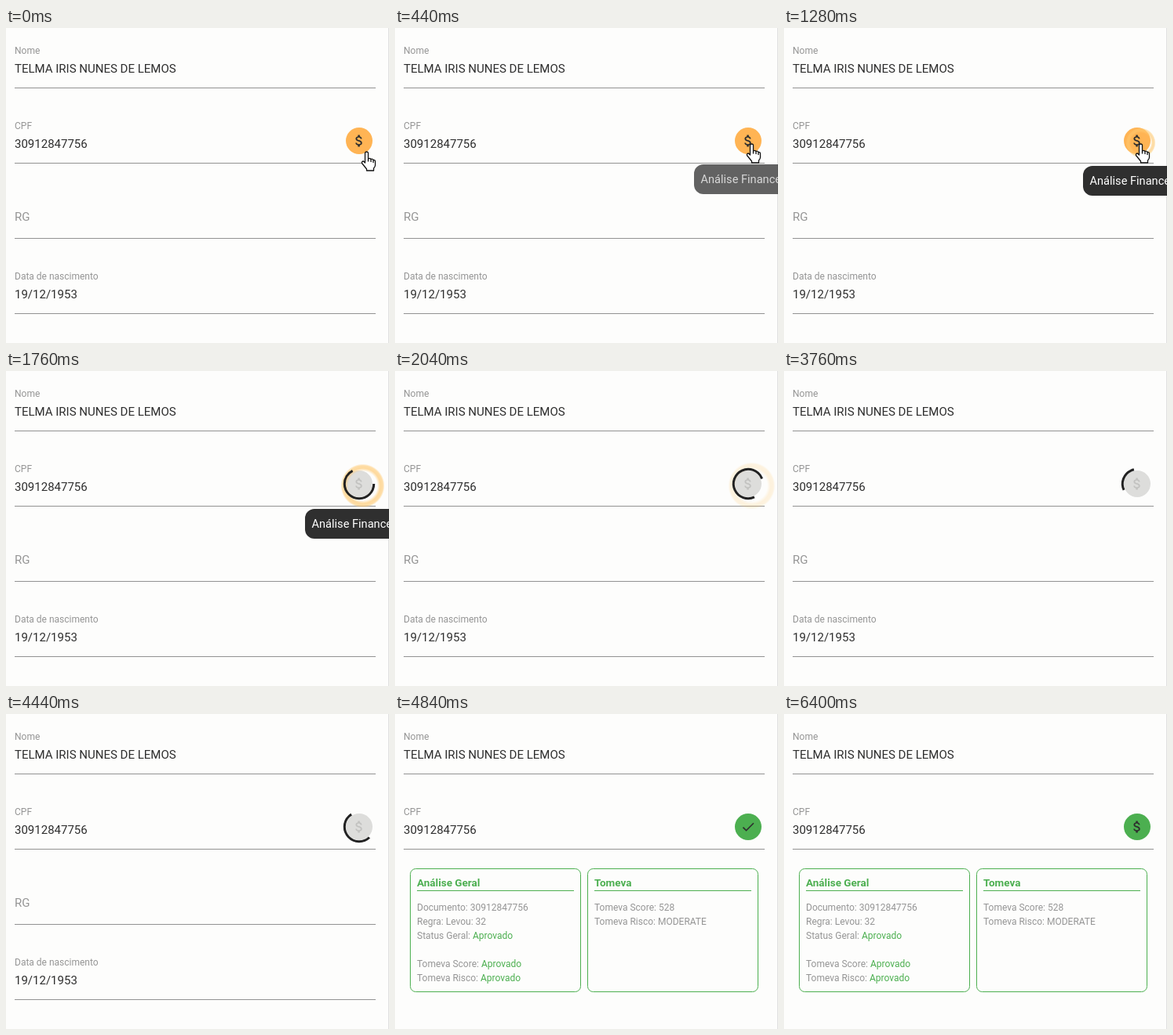
An HTML page with a canvas that plays this animation: 488 px wide and 402 px high, repeating every 6.96 s.

```html
<!DOCTYPE html>
<html lang="pt-BR">
<head>
<meta charset="utf-8">
<title>Análise</title>
<style>
  html, body { margin: 0; width: 100%; height: 100%; overflow: hidden; background: #fdfdfc; }
  canvas { display: block; width: 488px; height: 402px; }
</style>
</head>
<body>
<canvas id="stage" width="488" height="402"></canvas>
<script>
const ctx = document.getElementById('stage').getContext('2d');
const LOOP = 6960, STEP = 40;
const PRESS = 1120, BUSY = 1360, DONE = 4760, CHECK = 4800, RESET = 6400;
const BTN = { x: 450, y: 144, r: 17 };
const INK = '#2e2e2e', LABEL = '#959595', RULE = '#929292', GREEN = '#4caf50', PAGE = '#fdfdfc';
const FONT = 'Roboto, Arial, sans-serif';
const DOC = '30912847756';

const MONEY = new Path2D('M11.8 10.9c-2.27-.59-3-1.2-3-2.15 0-1.09 1.01-1.85 2.7-1.85 1.78 0 2.44.85 2.5 2.1h2.21c-.07-1.72-1.12-3.3-3.21-3.81V3h-3v2.16c-1.94.42-3.5 1.68-3.5 3.61 0 2.31 1.91 3.46 4.7 4.13 2.5.6 3 1.48 3 2.41 0 .69-.49 1.79-2.7 1.79-2.06 0-2.87-.92-2.98-2.1h-2.2c.12 2.19 1.76 3.42 3.68 3.83V21h3v-2.15c1.95-.37 3.5-1.5 3.5-3.55 0-2.84-2.43-3.81-4.7-4.4z');
const TICK = new Path2D('M9 16.17L4.83 12l-1.42 1.41L9 19 21 7l-1.41-1.41z');
const HAND = new Path2D('M-2 2Q-2 0 0 0Q2 0 2 2V9Q4 7.5 5.5 9.5Q7.5 8.5 8.5 10.5Q11 10 11 12.5V17Q11 19 9 21V24H0V22L-6 14.5Q-6.5 12 -4 12L-2 14Z');

const clamp = v => Math.min(1, Math.max(0, v));
const ramp = (t, a, b) => clamp((t - a) / (b - a));
const easeOut = v => 1 - (1 - v) ** 3;
const rad = deg => deg * Math.PI / 180;

// cubic-bezier(.4, 0, .2, 1)
function standard(x) {
  let lo = 0, hi = 1, s = x;
  for (let i = 0; i < 24; i++) {
    s = (lo + hi) / 2;
    const px = 1.2 * (1 - s) ** 2 * s + 0.6 * (1 - s) * s * s + s ** 3;
    if (px < x) lo = s; else hi = s;
  }
  return 3 * (1 - s) * s * s + s ** 3;
}

function text(str, x, y, size, color) {
  ctx.font = `${size} ${FONT}`;
  ctx.fillStyle = color;
  ctx.fillText(str, x, y);
  return x + ctx.measureText(str).width;
}

function rect(x, y, w, h, color) {
  ctx.fillStyle = color;
  ctx.fillRect(x, y, w, h);
}

function field(y, label, value) {
  if (value) {
    text(label, 11, y + 33, '12px', LABEL);
    text(value, 11, y + 57, '15px', INK);
  } else {
    text(label, 11, y + 54, '15px', LABEL);
  }
  rect(11, y + 76, 460, 1, RULE);
}

function card(x, title, rows) {
  ctx.strokeStyle = GREEN;
  ctx.lineWidth = 1;
  ctx.beginPath();
  ctx.roundRect(x + 0.5, 197.5, 217, 157, 7);
  ctx.stroke();
  text(title, x + 9, 220, 'bold 13.5px', GREEN);
  rect(x + 9, 225, 200, 1, GREEN);
  rows.forEach(([label, status], i) => {
    const y = 251 + i * 18;
    const end = text(label, x + 9, y, '12px', LABEL);
    if (status) text(status, end, y, '12px', GREEN);
  });
}

function results(t) {
  ctx.globalAlpha = 0.4 + 0.6 * ramp(t, DONE, DONE + 80);
  card(19, 'Análise Geral', [
    ['Documento: ' + DOC], ['Regra: Levou: 32'], ['Status Geral: ', 'Aprovado'], [''],
    ['Tomeva Score: ', 'Aprovado'], ['Tomeva Risco: ', 'Aprovado']
  ]);
  card(245, 'Tomeva', [['Tomeva Score: 528'], ['Tomeva Risco: MODERATE']]);
  ctx.globalAlpha = 1;
}

function icon(path, color) {
  ctx.save();
  ctx.translate(BTN.x - 10, BTN.y - 10);
  ctx.scale(20 / 24, 20 / 24);
  ctx.fillStyle = color;
  ctx.fill(path);
  ctx.restore();
}

function button(t) {
  const busy = t >= BUSY && t < DONE;
  ctx.fillStyle = busy ? '#dddddb' : t >= DONE ? GREEN : '#ffb454';
  ctx.beginPath();
  ctx.arc(BTN.x, BTN.y, BTN.r, 0, 2 * Math.PI);
  ctx.fill();
  icon(t >= CHECK && t < RESET ? TICK : MONEY, busy ? '#c2c2c0' : INK);
}

function spinner(t) {
  if (t < BUSY || t >= DONE) return;
  // the spinner stalls briefly while the request is pending
  const s = t - 1356 - 125 * ramp(t, 3200, 3325);
  const half = Math.floor(s / 666.5);
  const e = standard(s / 666.5 - half);
  const mid = -90 + 360 * s / 1568 + 135 * (half + e);
  const span = 10 + 265 * (half % 2 ? 1 - e : e);
  ctx.strokeStyle = '#222';
  ctx.lineWidth = 3;
  ctx.beginPath();
  ctx.arc(BTN.x, BTN.y, 18.7, rad(mid - span / 2), rad(mid + span / 2));
  ctx.stroke();
}

function ripple(t) {
  const p = ramp(t, PRESS, 1800);
  const alpha = 0.75 * Math.min(1, p * 4) * (1 - ramp(t, 1800, 2160));
  if (alpha <= 0) return;
  const r = 8 + 20 * easeOut(p) + 3 * ramp(t, 1800, 2160);
  const g = ctx.createRadialGradient(454.5, 146.5, 0, 454.5, 146.5, r);
  const tone = a => `rgba(255,200,110,${a * alpha})`;
  g.addColorStop(0.66, tone(0));
  g.addColorStop(0.8, tone(0.9));
  g.addColorStop(0.92, tone(0.8));
  g.addColorStop(1, tone(0));
  ctx.fillStyle = g;
  ctx.beginPath();
  ctx.arc(454.5, 146.5, r, 0, 2 * Math.PI);
  ctx.fill();
}

function tooltip(t) {
  const a = ramp(t, 320, 480) * (1 - ramp(t, 1840, 2000));
  if (!a) return;
  const y = 176 - 8 * (1 - a);
  ctx.globalAlpha = a;
  ctx.fillStyle = '#2f2f2f';
  ctx.beginPath();
  ctx.roundRect(381, y, 150, 38, 12);
  ctx.fill();
  text('Análise Financeira', 389.5, y + 24, '14.6px', '#fff');
  ctx.globalAlpha = 1;
}

function cursor(t) {
  if (t >= BUSY) return;
  const p = easeOut(ramp(t, 0, 480));
  ctx.save();
  ctx.translate(459.5 - 5 * p, 158 - 10 * p);
  ctx.fillStyle = '#fff';
  ctx.strokeStyle = '#111';
  ctx.lineWidth = 1.3;
  ctx.lineJoin = 'round';
  ctx.fill(HAND);
  ctx.stroke(HAND);
  ctx.beginPath();
  for (const [x, y] of [[2, 9], [5.5, 9.5], [8.5, 10.5]]) {
    ctx.moveTo(x, y);
    ctx.lineTo(x, y + 3.5);
  }
  ctx.stroke();
  ctx.restore();
}

function draw(t) {
  rect(0, 0, 488, 402, PAGE);
  rect(487, 0, 1, 402, '#e0e0e0');
  field(0, 'Nome', 'TELMA IRIS NUNES DE LEMOS');
  field(96, 'CPF', DOC);
  if (t < DONE) {
    field(192, 'RG');
    field(288, 'Data de nascimento', '19/12/1953');
  } else {
    results(t);
  }
  button(t);
  ripple(t);
  spinner(t);
  tooltip(t);
  cursor(t);
}

const start = performance.now();
function tick() {
  const t = (performance.now() - start) % LOOP;
  draw(Math.floor(t / STEP) * STEP);
  requestAnimationFrame(tick);
}
tick();
</script>
</body>
</html>
```
